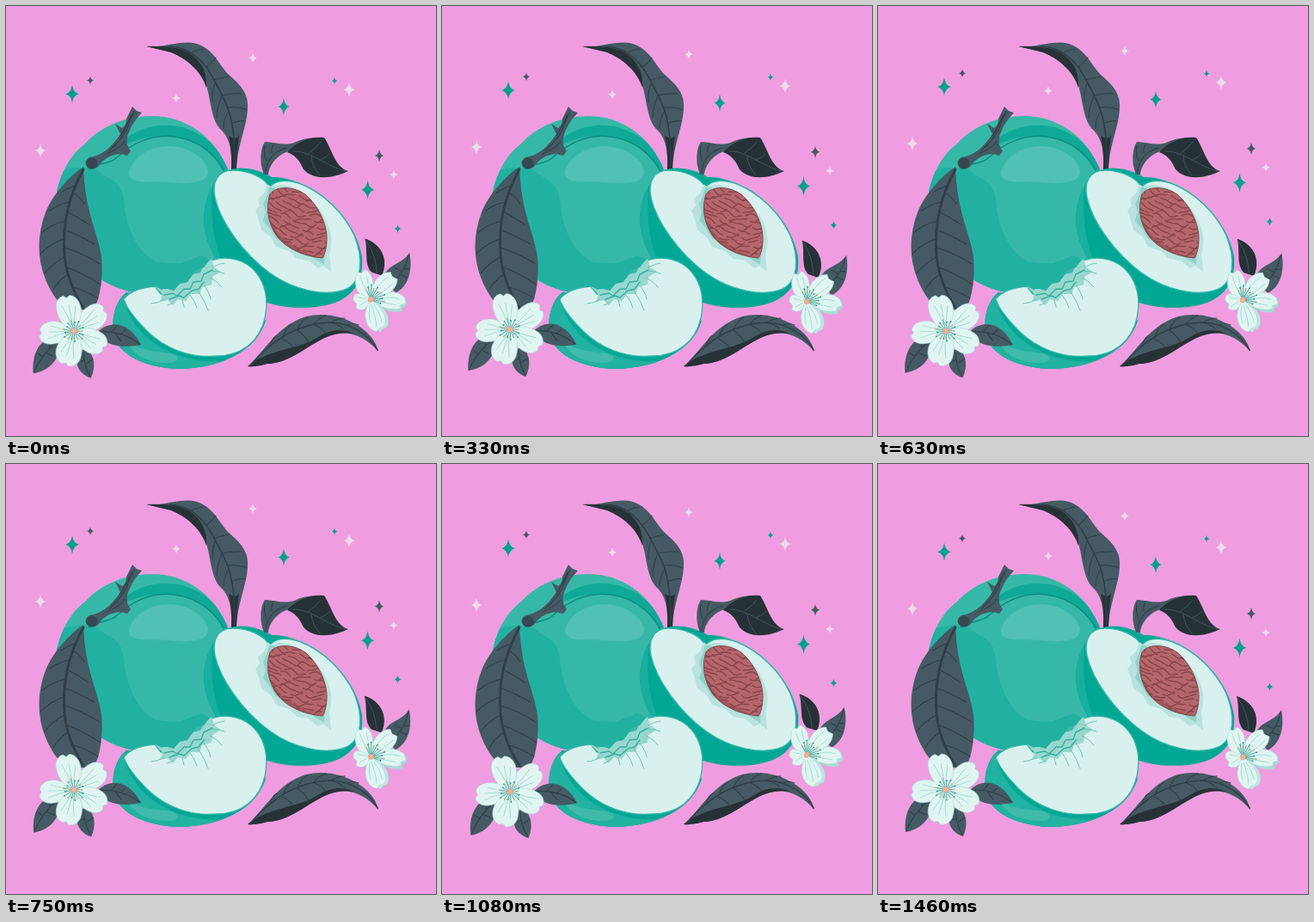
An HTML page for the animation above (1.5 s loop, 500 px wide and 500 px high).

```html
<!DOCTYPE html>
<html lang="en">
<head>
<meta charset="utf-8">
<title>Peaches</title>
<style>
  html, body { margin: 0; width: 100%; height: 100%; overflow: hidden; background: #ef9de0; }
  svg { display: block; width: 100vw; height: 100vh; }
  .slate { fill: #455a64; }
  .ink { fill: #263238; }
  .line { fill: none; stroke-linecap: round; stroke-linejoin: round; }
  .vein { stroke: #303f48; stroke-width: 1.1; }
  .rib { stroke: #303f48; stroke-width: 2.2; }
  .ray { stroke: #6cc5ba; stroke-width: 1; }
  .petal { fill: #e0f5f2; stroke: #a9dcd6; stroke-width: .6; }
  .fold { stroke: #8fd3cb; stroke-width: .7; }
  .stamen { stroke: #2a8f86; stroke-width: .7; }
</style>
</head>
<body>
<svg viewBox="0 0 500 500">
  <defs>
    <clipPath id="stone"><path d="M307 219C313 209 333 209 348 219C364 233 373 254 373 270C373 281 371 288 368 293C346 291 321 281 311 261C303 246 303 230 307 219Z"/></clipPath>
    <clipPath id="body"><path d="M58 222C63 193 75 173 92 160C111 139 140 128 170 128C208 128 242 150 259 192L250 285C242 318 218 337 188 337C152 337 120 328 100 310Z"/></clipPath>
    <g id="petal">
      <path class="petal" d="M0 0C5-9 17-15 31-14C39-13 43-8 43-3L40 0L42 4C40 12 30 15 20 13C10 10 4 5 0 0Z"/>
      <path class="line fold" d="M7-1Q20-3 32-7M8 0L31 1M7 1Q18 5 28 8"/>
    </g>
  </defs>

  <!-- tall leaf -->
  <path class="slate" d="M163 47C185 49 203 39 222 44C241 50 247 67 258 79C271 90 282 101 281 117C281 139 269 161 268 190H262C263 168 260 152 249 143C238 131 238 107 233 93C227 73 209 60 192 53Z"/>
  <path class="ink" d="M163 47C190 46 211 49 222 62C230 71 234 81 233 95C227 75 209 61 192 54Z"/>
  <path class="ink" d="M259 151Q268 157 271 150Q268 170 268 190H262Q263 166 259 151Z"/>
  <path class="line rib" style="stroke-width:1.6" d="M190 47C218 48 234 68 245 92C256 112 267 129 266 188"/>
  <path class="line vein" d="M233 71Q241 65 244 60M242 86Q254 83 259 82M251 104Q266 101 274 102M258 118Q272 117 280 121M264 136Q273 132 278 134M243 90Q239 102 240 111M251 105Q245 118 245 130M259 122Q253 131 253 142M216 54Q225 50 230 50"/>

  <!-- whole peach -->
  <g clip-path="url(#body)">
    <path fill="#36b8a8" d="M50 120H265V340H50Z"/>
    <path fill="#10a997" d="M128 168C143 141 184 133 211 143C238 153 254 172 259 195L250 205L100 186Z"/>
    <path fill="#36b8a8" d="M100 188C129 160 163 148 196 152C226 156 247 176 255 198L246 340H100Z"/>
    <path fill="#22b1a1" d="M60 195C76 186 91 187 105 190C119 202 134 202 137 225C139 256 152 286 174 297C190 302 211 293 218 311L205 340H50V220Z"/>
    <path class="line" stroke="#0b8f81" stroke-width="1.6" d="M97 189C109 182 121 184 129 176C151 156 174 149 196 152C226 156 247 175 256 197"/>
    <path fill="#51c1b4" d="M143 194C145 178 166 163 189 163C214 163 235 180 235 193C234 207 213 207 190 205C165 204 143 207 143 194Z"/>
  </g>

  <!-- branch and hanging leaf -->
  <path class="slate" d="M90 187C73 198 54 220 46 240C36 266 36 294 46 318C53 335 62 347 72 353H101C110 343 113 312 111 292C107 262 92 242 90 187Z"/>
  <path class="line rib" style="stroke-width:2.8" d="M90 190C74 219 65 252 68 289C70 315 80 335 90 351"/>
  <path class="line vein" d="M81 209Q72 211 64 217M74 228Q61 230 51 238M69 250Q53 254 42 263M67 271Q52 276 40 288M68 292Q54 299 45 311M72 312Q61 319 55 330M78 217Q85 221 91 230M71 239Q83 245 96 254M67 260Q84 266 103 277M68 281Q86 286 109 300M71 304Q87 309 110 324M78 327Q91 330 107 340"/>
  <path class="slate" d="M147 117L152 122L158 124L151 132L146 140L142 149Q138 160 145 169L141 174L133 172C120 173 112 179 107 187Q100 192 94 187Q90 180 97 176C110 174 120 166 127 157L133 149L127 137L135 142Q140 139 140 131Z"/>
  <ellipse cx="100" cy="183" rx="6.5" ry="6.5" fill="#35474f"/>
  <path class="line vein" d="M149 123Q143 133 140 144Q133 157 120 168M138 158Q131 166 117 172M146 126Q139 142 133 151"/>

  <!-- halved peach -->
  <path fill="#00a794" d="M255 193C240 204 230 224 230 250C231 281 254 315 281 335C307 351 344 354 372 348C404 341 416 320 414 292C409 261 387 233 360 216C340 203 321 198 309 199C291 188 268 185 255 193Z"/>
  <path fill="#18af9e" d="M255 193C240 204 230 224 230 250C231 272 241 292 256 311C249 288 236 269 240 210Z"/>
  <path fill="#d9f1ee" stroke="#2fb6a6" stroke-width="1.4" d="M306 211C301 199 282 191 263 191C247 191 239 204 243 223C249 251 276 288 306 310C335 331 373 339 396 329C414 320 416 294 405 267C393 240 368 217 343 207C326 201 313 203 306 211Z"/>
  <path fill="#b9e2dd" d="M304 207L300 218L293 224L295 232L290 238L294 249L297 261L308 269L314 280L329 285L339 294L352 296L363 305L369 302L378 309L376 288C386 264 366 229 340 214Q322 204 308 210Z"/>
  <path fill="#8fd2ca" d="M306 211L303 222L299 230L302 240L299 249L307 259L314 270L327 279L341 288L356 292L370 301L371 286L312 211Z"/>
  <g clip-path="url(#stone)">
    <path fill="#b5666a" d="M295 200H380V300H295Z"/>
    <g id="grooves" class="line" stroke="#87444b" stroke-width="1.35"></g>
    <path fill="#87444b" opacity=".45" d="M303 230C305 255 318 277 368 294L345 298L300 270Z"/>
  </g>
  <path class="line" stroke="#87444b" d="M307 219C313 209 333 209 348 219C364 233 373 254 373 270C373 281 371 288 368 293C346 291 321 281 311 261C303 246 303 230 307 219Z"/>
  <path class="slate" d="M300 196C294 181 296 165 301 158C313 158 322 163 335 159C345 154 357 152 365 154L341 169C325 164 306 181 305 196Z"/>
  <path class="ink" d="M327 170C337 158 354 151 370 153C379 166 382 187 398 192C379 201 358 203 346 190C341 179 337 174 327 170Z"/>
  <path class="line vein" d="M302 194Q303 172 326 165M303 180Q299 171 301 163M309 171Q308 165 311 161"/>
  <path class="line" stroke="#455a64" stroke-width=".9" d="M334 169C354 168 373 187 395 192M352 171Q361 165 366 158M365 179Q373 176 376 172M355 175Q356 187 365 197"/>

  <!-- slice -->
  <path fill="#00a794" d="M140 333C125 344 121 371 127 388C137 410 170 422 204 422C250 420 291 402 302 366L280 340Z"/>
  <path fill="#21b2a1" d="M140 333C125 344 121 371 127 388C137 410 170 422 204 422C222 421 240 418 252 413C200 417 151 389 138 345Z"/>
  <path fill="#40baab" d="M141 386C151 402 174 401 191 404C205 407 202 416 183 415C163 413 143 405 141 386Z"/>
  <path fill="#d9f1ee" stroke="#2fb6a6" stroke-width="1.3" d="M137 341C144 331 160 327 173 326L180 335L187 336L192 345L237 307L236 297C258 288 280 296 291 310C303 325 305 343 301 363C295 390 274 407 245 407C213 410 183 397 164 378C150 364 140 351 137 341Z"/>
  <path fill="#98d7cf" d="M173 326L181 329L188 329L195 331L202 323L211 321L217 312L226 310L230 301L239 294L242 304L250 309L240 315L239 324L228 327L225 335L215 335L209 343L200 341L194 348L188 342L179 344L182 335Z"/>
  <path fill="#22b1a1" d="M172 325L181 330L190 326L198 327L207 317L214 317L221 307L230 304L237 295L227 290L175 310Z"/>
  <path class="line" stroke="#36b0a1" stroke-width="1.4" d="M184 336L194 334L199 337L207 329L214 329L218 321L227 320L230 312L240 307M190 341L201 337L207 339L216 331L224 329L230 321"/>
  <path class="line ray" d="M239 308Q247 308 254 311M237 316Q246 320 251 327M230 325Q237 333 238 341M223 331Q231 342 235 354M214 336Q220 343 222 351M205 342L207 350M194 345Q191 348 188 348M184 341Q176 346 169 346M240 304Q248 299 254 299"/>

  <!-- low leaf -->
  <path class="slate" d="M281 419C301 402 314 372 349 361C384 352 427 373 433 402C417 383 395 375 374 384C352 392 331 414 304 416Q292 420 281 419Z"/>
  <path class="ink" d="M281 419C304 399 339 400 361 386C373 378 389 373 405 381C380 377 365 389 351 397C333 409 318 416 304 416Q292 420 281 419Z"/>
  <path class="line rib" style="stroke-width:1.6" d="M284 418C310 387 341 369 377 368C402 369 422 382 432 400"/>
  <path class="line vein" d="M307 396Q309 386 315 383M322 385Q325 374 333 370M339 376Q343 366 351 362M358 370Q364 362 372 360M378 368Q386 363 394 363M397 371Q404 368 410 371M339 377Q347 383 352 391M359 371Q367 374 372 381M380 369Q388 371 392 375M321 387Q330 391 335 398"/>

  <!-- blossoms -->
  <g id="left">
    <path class="slate" d="M64 386C43 382 29 402 32 428C53 424 61 411 65 392Z"/>
    <path class="slate" d="M87 401C78 413 83 428 99 433C105 419 103 408 95 399Z"/>
    <path class="slate" d="M106 380C119 366 142 365 157 394C140 397 118 399 106 380Z"/>
    <path class="line vein" d="M62 389Q43 403 33 426M90 403Q91 419 98 431M109 379Q136 378 155 393M51 399V390M43 409L37 404M47 404L56 408M91 412L87 414M94 416L101 411M122 379L129 372M133 382L139 377M127 381L134 390"/>
    <g id="leftPetals"></g>
    <g id="leftHeart"></g>
  </g>
  <g id="right">
    <path class="ink" d="M417 270C434 275 446 292 437 313L425 309C416 300 421 284 417 270Z"/>
    <path class="slate" d="M469 286C473 307 468 325 453 333L439 317C441 299 460 301 469 286Z"/>
    <path class="line" stroke="#455a64" stroke-width=".9" d="M418 272Q430 288 431 309"/>
    <path class="line vein" d="M468 289Q464 309 447 324M462 305L468 305M458 312L466 315M460 308L452 304M454 316L445 311"/>
    <path class="petal" style="fill:#a9dcd6" d="M427 341C439 331 455 329 465 340L466 347L460 351L461 354C448 358 436 350 427 341Z"/>
    <path class="petal" d="M424 341C437 330 454 329 463 338L465 345L459 347L459 351C446 354 434 349 424 341Z"/>
    <path class="petal" d="M424 341C406 337 403 320 409 309L414 310L417 306C428 310 429 328 424 341Z"/>
    <path class="petal" d="M424 341C424 322 434 309 447 309L449 314L455 317C454 333 438 337 424 341Z"/>
    <path class="petal" d="M424 341C412 332 403 331 404 342L408 346L407 351C416 356 421 350 424 341Z"/>
    <path class="petal" style="fill:#bfe6e1" d="M424 341C443 350 448 363 443 373L438 375L436 378C425 376 420 358 424 341Z"/>
    <path class="petal" d="M424 341C439 350 444 363 440 372L434 374L431 378C418 375 413 357 424 341Z"/>
    <path class="line fold" d="M427 336Q433 321 445 314M429 338Q440 331 450 322M422 335Q414 324 412 314M423 333Q421 321 419 313M432 341Q446 336 457 340M432 343L453 347M425 347Q430 361 431 372M423 348Q421 360 424 367M428 347Q436 358 437 367M419 340L409 338M419 343L411 348"/>
    <g id="rightHeart"></g>
  </g>
  <g id="stars"></g>
</svg>
<script>
  const LOOP = 1500, STEPS = 36, TAU = Math.PI * 2;
  const get = id => document.getElementById(id);

  function add(parent, tag, attrs) {
    const el = document.createElementNS('http://www.w3.org/2000/svg', tag);
    for (const k in attrs) el.setAttribute(k, attrs[k]);
    return parent.appendChild(el);
  }

  // Stone grooves: slanted wavy rows, broken up by dashes
  for (let i = 0; i < 19; i++) {
    let d = '';
    for (let x = 300; x <= 378; x += 3) {
      const u = x - 338;
      const y = 206 + i * 5.2 + u * .2 - u * u * .006
        + 2 * Math.sin(x * .24 + i * 1.9) + Math.sin(x * .43 + i * 2.7);
      d += (d ? 'L' : 'M') + x + ' ' + y.toFixed(1);
    }
    add(get('grooves'), 'path', {
      d, 'stroke-dasharray': `${17 + i * 7 % 13} 5 ${9 + i * 5 % 9} 4`, 'stroke-dashoffset': i * 11
    });
  }

  // angle, length scale, width scale
  [[-35, 1.03, 1], [176, .94, .95], [29, .96, 1], [104, .95, 1.08], [-103, .99, 1.02]].forEach(([a, sx, sy]) =>
    add(get('leftPetals'), 'use', { href: '#petal', transform: `translate(79 378.5) rotate(${a}) scale(${sx} ${sy})` }));

  function heart(group, cx, cy, from, sweep, count, len) {
    for (let i = 0; i < count; i++) {
      const a = (from + sweep * i / count) * TAU / 360;
      const r = len * (.72 + .28 * (i * 7 % 5) / 4);
      const x = cx + r * Math.cos(a), y = cy + r * Math.sin(a);
      add(group, 'path', { class: 'line stamen', d: `M${cx} ${cy}L${x} ${y}` });
      add(group, 'circle', { cx: x, cy: y, r: .9, fill: i % 3 ? '#2a8f86' : '#f0a35f' });
    }
    add(group, 'circle', { cx, cy, r: 3.4, fill: '#f2a6a0' });
    add(group, 'circle', { cx, cy, r: 1.6, fill: '#f3bd6b' });
  }
  heart(get('leftHeart'), 79, 378.5, 0, 360, 17, 13);
  heart(get('rightHeart'), 424, 341, -115, 150, 11, 17);

  const teal = '#00a08f', slate = '#455a64', pale = '#ecdcec';
  // x, y, half width, half height, colour
  [
    [77, 102.3, 7.8, 10.5, teal], [98, 86.5, 4.2, 5, slate], [287, 60.5, 5, 6, pale],
    [198, 107, 5, 5.5, pale], [323, 117, 6.5, 10, teal], [382, 87, 3.2, 4.2, teal],
    [399, 97.3, 6.5, 8.2, pale], [40, 168.3, 6.2, 8.4, pale], [434, 174, 5, 7.2, slate],
    [451, 196, 4.8, 5.2, pale], [420.5, 213.7, 7.5, 11, teal], [455.5, 259, 4, 5, teal]
  ].forEach(([x, y, w, h, fill]) => {
    const p = w * .16, q = h * .16;
    add(get('stars'), 'path', {
      fill, transform: `translate(${x} ${y})`,
      d: `M0 ${-h}Q${p} ${-q} ${w} 0Q${p} ${q} 0 ${h}Q${-p} ${q} ${-w} 0Q${-p} ${-q} 0 ${-h}Z`
    });
  });

  const sway = (id, s, dy, turn, x, y) =>
    get(id).setAttribute('transform', `translate(0 ${s * dy}) rotate(${s * turn} ${x} ${y})`);

  function draw(now) {
    const step = Math.floor((now % LOOP + 4) * STEPS / LOOP);
    const a = TAU * (step + 1) / STEPS, s = Math.sin(a);
    get('stars').setAttribute('transform', `translate(0 ${-4.25 * (1 - Math.cos(a))})`);
    sway('left', s, -2.5, 1.7, 79, 378.5);
    sway('right', s, 2.6, 1.3, 424, 341);
  }

  const start = performance.now();
  function tick() {
    draw(performance.now() - start);
    requestAnimationFrame(tick);
  }
  tick();
</script>
</body>
</html>
```
